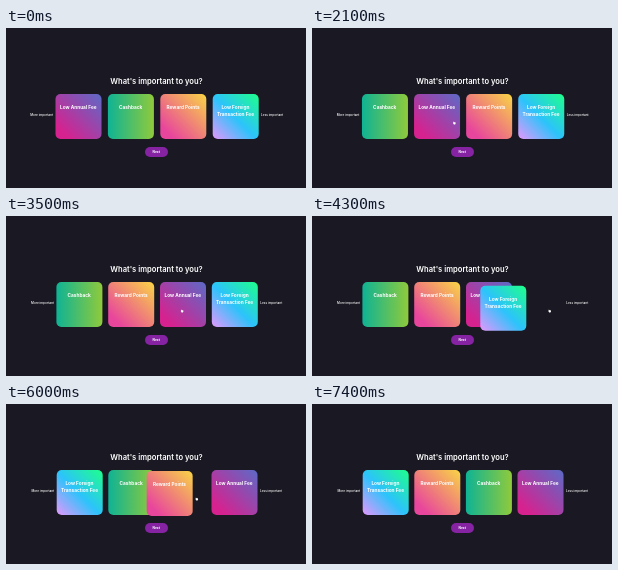
Recreate the animation shown at these times as an HTML page. Size 300x160 px, loop 7800 ms.

```html
<!DOCTYPE html>
<html lang="en">
<head>
<meta charset="utf-8">
<title>Sort priorities</title>
<style>
  html, body { margin: 0; width: 100%; height: 100%; overflow: hidden; background: #1a1923; }
  #stage {
    position: relative; width: 300px; height: 160px; overflow: hidden;
    background: #1a1923; color: #fff; font-family: Inter, "Liberation Sans", sans-serif;
  }
  #stage > * { position: absolute; left: 0; top: 0; white-space: nowrap; }
  #stage > h1 {
    margin: 0; top: 49px; width: 301px; text-align: center;
    font-size: 7.6px; line-height: 10px; font-weight: 600;
  }
  #stage > .label { top: 85px; font-size: 3.1px; line-height: 4px; font-weight: 500; }
  #stage > .button {
    left: 138.5px; top: 118.5px; width: 23.5px; height: 10.7px; border-radius: 6px;
    background: #8523a3; text-align: center; font-size: 3.2px; line-height: 10.7px; font-weight: 700;
  }
  .card {
    box-sizing: border-box; width: 45.6px; height: 45.4px; padding-top: 9.8px; border-radius: 5px;
    text-align: center; font-size: 4.75px; line-height: 7.2px; font-weight: 700;
  }
  .annual { background: linear-gradient(45deg, #d6228f 15%, #6366c4 95%); }
  .cash { background: linear-gradient(90deg, #0fb394, #8fca3c); }
  .reward { background: linear-gradient(45deg, #e8459c 15%, #f9d545 100%); }
  .foreign { background: linear-gradient(45deg, #d49bfb 4%, #2cc3fb 48%, #1ffb92 96%); }
  #cursor { width: 4px; height: 4px; z-index: 3; }
</style>
</head>
<body>
<div id="stage">
  <h1>What's important to you?</h1>
  <div class="label" id="more">More important</div>
  <div class="label" id="less">Less important</div>
  <div class="card annual">Low Annual Fee</div>
  <div class="card cash">Cashback</div>
  <div class="card reward">Reward Points</div>
  <div class="card foreign">Low Foreign<br>Transaction Fee</div>
  <div class="button">Next</div>
  <svg id="cursor" viewBox="0 0 4 4"><path d="M1 .4L1.8 1.2H3L3.2 2.4 2.6 3.5H1.4L.6 2.2Z" fill="#fff"/></svg>
</div>
<script>
const LOOP = 7800, STEP = 100, FIRST = 100, LAST = 7400;
const CARD = 45.6, TOP = 66, MIDDLE = 150.9, POINTER_Y = 93;
const HOLD = 150;      // the pointer catches up this long after a drop
const OVERSHOOT = 3;   // how far a drag goes past the middle of its last slot
const ENTER = { x: 149, y: 131 }, EXIT = { x: 149, y: 162 };

// grab: where in the card the pointer takes hold; sag: vertical bow of the path
const drags = [
  { card: 1, slots: 1, start: 900, end: 1500, grab: 27, sag: -2 },
  { card: 2, slots: 1, start: 2400, end: 3000, grab: 25, sag: 1.2 },
  { card: 3, slots: 3, start: 3890, end: 5220, grab: 30, sag: 4.5 },
  { card: 2, slots: 1, start: 5800, end: 6500, grab: 35, sag: 1.2 }
];

const $ = id => document.getElementById(id);
const cards = [...document.querySelectorAll('.card')];
const clamp = p => Math.min(1, Math.max(0, p));
const ease = p => p * p * (3 - 2 * p);
const mix = (a, b, k) => a + (b - a) * k;

// The row tightens a little with each of the first reorderings.
function makeRow(order, moves) {
  const pitch = Math.max(51.6, 52.4 - 0.3 * moves);
  const width = 3 * pitch + CARD;
  const left = MIDDLE - width / 2;
  return { order, moves, pitch, left, right: left + width, x: card => left + pitch * order.indexOf(card) };
}

// A held card takes over each slot whose middle the pointer has passed.
function dragAt(drag, row, t) {
  const p = clamp((t - drag.start) / (drag.end - drag.start));
  const lead = drag.grab - CARD / 2;
  const shift = ease(p) * (drag.slots * row.pitch + lead + OVERSHOOT);
  const passed = Math.max(0, Math.floor((shift - lead) / row.pitch));
  const from = row.order.indexOf(drag.card);
  const order = row.order.filter(card => card !== drag.card);
  order.splice(from - passed, 0, drag.card);
  return {
    x: row.x(drag.card) - shift,
    y: TOP + drag.sag * Math.sin(Math.PI * p),
    row: makeRow(order, row.moves + passed)
  };
}

let settled = makeRow([0, 1, 2, 3], 0);
for (const drag of drags) {
  const drop = dragAt(drag, settled, drag.end);
  drag.row = settled;
  drag.from = { x: settled.x(drag.card) + drag.grab, y: POINTER_Y };
  drag.to = { x: drop.x + drag.grab, y: POINTER_Y };
  settled = drop.row;
}

// The pointer rests at the pick-up point during a drag and glides in between.
function pointerAt(t) {
  const i = drags.findIndex(d => t < d.end + HOLD);
  const next = drags[i], prev = i < 0 ? drags[drags.length - 1] : drags[i - 1];
  const a = prev ? prev.to : ENTER, b = next ? next.from : EXIT;
  const t0 = prev ? prev.end + HOLD : FIRST, t1 = next ? next.start : LAST;
  const k = ease(clamp((t - t0) / (t1 - t0)));
  return [mix(a.x, b.x, k), mix(a.y, b.y, k)];
}

function move(el, x, y) {
  el.style.transform = `translate(${x}px, ${y}px)`;
}

function draw(t) {
  const drag = drags.find(d => t < d.end);
  const now = drag && dragAt(drag, drag.row, t);
  const row = drag ? now.row : settled;
  cards.forEach((el, i) => {
    const held = drag && t >= drag.start && drag.card === i;
    el.style.zIndex = held ? 2 : 1;
    if (held) move(el, now.x, now.y);
    else move(el, row.x(i), TOP);
  });
  move($('more'), row.left - 25.3, 0);
  move($('less'), row.right + 2.8, 0);
  $('cursor').style.visibility = t >= FIRST && t < LAST ? 'visible' : 'hidden';
  move($('cursor'), ...pointerAt(t));
}

const start = performance.now();
function tick(now) {
  const t = Math.max(0, now - start) % LOOP;
  draw(Math.min(LAST, Math.floor(t / STEP) * STEP));
  requestAnimationFrame(tick);
}
tick(start);
</script>
</body>
</html>
```
